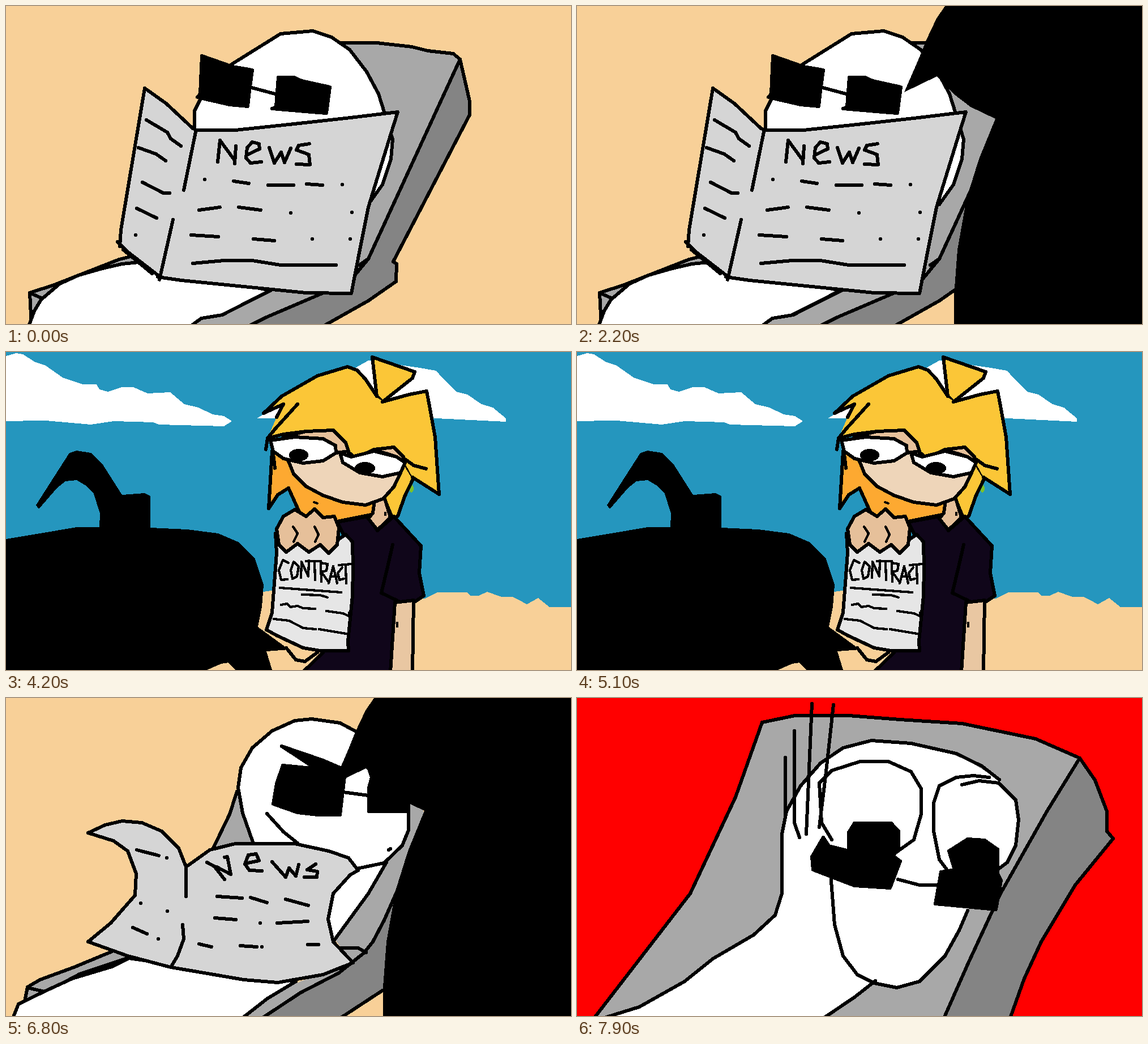
Recreate the animation shown at these times as an HTML page. Size 998 by 561 pixels, loop 8000 ms.

```html
<!DOCTYPE html>
<html lang="en">
<head>
<meta charset="utf-8">
<title>Newspaper and shadow</title>
<style>
html, body { margin: 0; width: 100%; height: 100%; overflow: hidden; }
svg { display: block; width: 100vw; height: 100vh; shape-rendering: crispEdges; }
path, ellipse { stroke: #000; stroke-width: 6; stroke-linecap: round; stroke-linejoin: round; fill: none; }
.thick path { stroke-width: 7.6; }
path.fine { stroke-width: 4.2; }
.light { fill: #a8a8a8; } .dark { fill: #848484; } .paper { fill: #d5d5d5; }
.white { fill: #fff; } .black { fill: #000; } .hair { fill: #fbc637; } .beard { fill: #fda931; }
.skin { fill: #e6c09a; } .arm { fill: #e9c7a2; } .face { fill: #eed5b9; } .sand { fill: #f8d098; }
.shirt { fill: #10061a; } .sheet { fill: #e6e6e6; } .leaf { fill: #7ac12b; }
path.bare, ellipse.bare { stroke: none; }
</style>
</head>
<body>
<svg viewBox="0 0 998 561">
<rect id="backdrop" width="998" height="561"/>

<g data-scene="reading">
  <g data-boil="0 -2 0">
    <path class="light" d="M45 565L42 506 85 492 200 447 228 440 235 455 95 490 50 538ZM42 506L62 515"/>
    <path class="white" d="M40 565L50 538 62 518 95 490 128 475 170 463 205 455 235 452 467 502 382 545 330 565"/>
  </g>
  <path class="light bare" d="M590 65L655 65 717 72 745 79 790 84 802 94 640 448 612 482 556 508 428 561H330L345 551 382 545 467 502 500 400Z"/>
  <path class="dark" d="M802 94L819 168V192L684 451 690 455 689 486 640 520 560 565H428L460 549 556 508 612 480 640 446Z"/>
  <path d="M590 65H655L717 72 745 79 790 84 802 94M640 446L624 457M330 562L345 551 382 545 425 523 467 502"/>
  <path class="white" d="M333 218V185L343 165 395 105 485 49 542 44 575 55 607 77 637 116 658 155 669 190 683 235 680 270 665 315 640 350 560 300"/>
  <path class="black" d="M346 88L400 107 435 113 430 150 427 177 395 174 338 161 343 155ZM481 126H509L522 132 572 143 566 189 540 187 470 181 477 178Z"/>
  <path d="M430 143L475 155"/>
  <g data-boil="0 -5 0">
    <path class="paper bare" d="M245 145L283 172 337 219 405 219 500 209 692 187 640 355 610 507 530 506 271 478 201 420Z"/>
    <path d="M201 424L203 395 245 145 283 172 330 216 337 219H405L500 209 600 198 692 187 680 225 660 290 640 355 625 430 610 507 530 506 440 497 310 484 268 478M335 222L314 325M295 377L271 483M197 416L214 433 271 477M207 430L258 472"/>
    <path d="M248 201L285 223 291 234 309 247M234 250L265 261 282 273M241 311L278 330H289M231 357L266 374M229 404h.1M351 306h.1M402 309L429 313M463 316H508M531 314L559 316M594 315h.1M341 360L378 355M411 355L450 360M503 365h.1M611 364h.1M327 404L375 407M437 411L474 414M541 411h.1M608 411h.1M330 454L385 449H435L485 457H583"/>
    <path aria-label="News" d="M374 275L378 237 403 271M406 247L404 278M425 263L448 252 447 243 435 240 426 250 424 268 432 277 451 275M465 250L474 277 486 258 492 276 503 251M536 243L517 246 513 254 535 262 537 280 513 279"/>
  </g>
</g>

<g data-scene="glaring smirking">
  <path class="light bare" d="M425 125L365 268 436 258 580 425 613 467 520 500 385 561H455L588 485 632 450 648 430 668 392 740 230 737 195 600 100Z"/>
  <path class="dark" d="M740 230L668 392 648 430 632 450 588 485 520 520 452 565H590L665 516H740"/>
  <path d="M583 441H622L636 449"/>
  <path class="light" d="M30 565L32 540 38 510 60 497 120 475 190 446 220 457 130 487 72 518 33 561ZM38 511L72 519"/>
  <g data-scene="glaring">
    <path d="M430 118L415 155 395 205 365 267"/>
    <path class="white" d="M33 565L45 540 72 518 130 487 215 455 300 470 510 500 430 543 376 565"/>
    <path class="white bare" d="M560 260L672 283 660 315 600 390 580 430 540 350Z"/>
    <path d="M672 285L660 315 640 342 600 390 580 430"/>
    <path class="white" d="M436 256L420 215V160L430 118 445 78 470 53 510 40 560 46 610 66 711 150V235L700 260 672 280 630 285 585 278 520 255"/>
    <path d="M455 217L485 238 520 255"/>
    <path class="black" d="M482 87L541 106H592L596 123 530 116Z"/>
    <path class="black" d="M473 125L545 112 590 110 587 193 581 200H478L473 195ZM663 160V185L711 193V150Z"/>
    <path d="M595 157H662"/>
  </g>
  <g data-scene="smirking">
    <path d="M408 165L395 205 365 267"/>
    <path class="white" d="M20 565L30 540 75 518 125 495 195 474 225 459 300 470 520 500 470 530 425 565" data-boil="0 -4 0"/>
    <path class="white bare" d="M560 260L672 290 640 345 580 427 540 350Z"/>
    <path d="M672 290L640 345 580 427"/>
    <g data-boil="0 0 -1">
      <path class="white" d="M436 256L418 205 410 160 415 125 435 90 470 60 510 42 540 39 590 46 620 62 711 190V235L700 262 668 293 620 303 600 285 515 260"/>
      <path d="M461 206L490 238 515 258M676 270l3-2"/>
      <path class="black" d="M487 87L560 112 597 128 540 122Z"/>
      <path class="black" d="M489 121L540 126 599 132 590 208H550L515 204 472 189 478 153ZM642 130L646 142 641 160V202H708V140Z"/>
      <path d="M595 168L640 174"/>
    </g>
  </g>
  <path class="paper" d="M145 238L175 224 205 217 240 220 275 235 305 265 318 298 360 268 405 257H510L570 270 605 282 622 304 608 312 578 345 569 390 578 430 613 467 560 488 480 502 420 497 350 485 291 475 215 455 145 430 185 397 228 348 230 310 215 270 190 252Z"/>
  <path d="M318 295V350M312 400L314 425 303 455 291 475"/>
  <path d="M231 268L270 278M284 282h.1M238 362h.1M285 376h.1M224 405L249 416M269 425h.1M373 350L417 353M432 352L461 361M494 355L534 366M369 388L406 391M449 397h.1M479 397L533 394M341 434L363 439M414 437L443 439M452 439h.1M533 435H552"/>
  <path aria-label="News" d="M355 290L368 297 386 320M372 298L397 311 391 280 386 281M427 291L447 287 442 275 428 277 422 293 430 304 452 305M470 289L494 316 500 300 512 314 517 294M547 293L532 303 550 306 549 316H527"/>
</g>

<g id="shadow" data-scene="reading glaring smirking">
  <path class="black bare" d="M650 0L635 22 617 60 605 90 578 152 636 124 665 155 695 178 739 199 710 270 688 340 672 430 666 510V561H998V0Z"/>
  <path class="black bare" d="M636 0L628 35 612 70 600 105 594 159 630 129 662 161 690 185 737 199 705 270 683 340 668 400 661 510V561H998V0Z"/>
</g>

<g data-scene="contract">
  <g data-boil="0 2 0">
    <path class="white bare" d="M-10 10L18 2 30 4 50 17 70 24 100 45 135 57 160 57 165 66 180 70 205 62 225 62 250 73 290 71 315 92 340 98 365 110 385 113 399 122 385 131 270 128 260 124 190 122 150 128 70 121-10 122Z"/>
    <path class="white bare" d="M443 117L480 95 560 60 640 15 725 27 760 33 770 45 795 70 815 75 840 92 860 98 883 117V123L760 117Z"/>
  </g>
  <path class="sand bare" data-boil="0 0 1" d="M0 480L455 423 475 420 600 430 740 435 762 424H815L820 430H835L850 423 875 432H895L905 437 920 445 940 434 960 450H998V565H0Z"/>
  <g data-boil="0 0 -1">
    <ellipse class="leaf bare" cx="716" cy="241" rx="4" ry="7"/>
    <path class="hair" d="M668 258L682 292 692 290 704 255 720 222 700 190"/>
    <path class="beard" d="M470 175L464 276 480 252 499 240 518 282 550 305 590 298 650 286 655 245 500 190"/>
    <path class="shirt" d="M524 565L560 530 600 330 585 300 640 290 656 315 685 290 733 342 730 390 738 430 720 442 688 440 680 565Z"/>
    <path d="M683 340L675 375 663 425 690 438"/>
    <path class="arm" d="M687 442L720 438 718 565H679Z"/>
    <path class="skin" d="M651 262L648 284 640 294 656 314 679 292 668 255"/>
    <path class="face" d="M478 160L500 195 508 215 530 237 560 253 595 265 635 270 666 259 685 238 697 213 702 180 590 150Z"/>
    <path class="hair" d="M647 9L722 35 718 46 665 88 655 78Z"/>
    <path class="hair bare" d="M455 108L487 78 550 42 603 26 620 32 655 80 667 88 742 70 748 95 758 150 765 251 718 221 700 188 685 168 650 172 618 187 602 175 578 138 490 145 462 152 478 115 490 92Z"/>
    <path d="M455 108L487 78 550 42 603 26 620 32 635 48 655 78M665 88L712 75 743 69 748 95 758 150 765 251 718 221M455 108L490 92 478 115M515 92L476 135 462 152 459 172M472 180L475 205M742 206L720 200 702 187 685 168 650 172 618 187 605 177 590 150 578 138 530 140 490 145 462 152"/>
    <path class="skin" d="M490 150L530 140 578 138 600 160 605 175 583 178 582 165 560 153ZM650 172L685 168 702 185V195L690 185Z"/>
    <path class="white" d="M467 156L510 150 560 153 582 165 583 178 560 192 525 196 490 188 472 175ZM590 178L610 185 650 175 690 185 705 195 697 213 665 220 625 213 595 195Z"/>
    <ellipse class="black bare" cx="517" cy="182" rx="17" ry="11"/>
    <ellipse class="black bare" cx="634" cy="205" rx="18" ry="11"/>
    <path class="fine" d="M544 265l6 2M670 284v3M691 478v6"/>
    <path class="sand" d="M495 522L512 543 528 546 550 530"/>
    <path class="sheet" d="M476 320L478 355 470 460 460 490 478 500 525 522 555 527H605L604 510 612 430 613 380 612 335 600 322 588 330Z"/>
    <path class="skin" d="M478 312L490 290 510 278 530 290 545 277 560 292 580 290 588 310 585 340 570 355 555 340 535 353 515 338 495 353 482 340Z"/>
    <path class="fine" d="M507 308L515 320 508 335M545 308L552 322 546 335"/>
    <path class="fine" aria-label="CONTRACT" d="M499 372L489 367 482 385 486 402 497 401M508 370L503 385 506 400 514 396 517 378ZM521 398L522 370 534 396 535 368M530 369H556M545 370L546 402M557 405L556 372 568 374 566 386 557 388 570 406M570 408L578 378 585 408M573 396H584M594 380L586 390 589 402 597 400M588 376L610 374M600 377L601 408"/>
    <path class="fine" d="M484 416L592 424M523 428L555 429 568 433M486 446L497 444 502 450 515 448 525 452 546 453M566 457L595 461 606 466V460M473 471L500 474 525 487 547 489M553 489L601 497"/>
  </g>
  <path class="black bare" d="M0 330L60 320 125 309H165L166 285 155 250 140 235 125 226 105 228 90 240 58 277 53 270 85 220 112 178 125 174 150 178 170 197 205 252 245 249 255 254V310L320 313 375 320 410 335 440 365 455 410 452 450 445 485 500 525 460 528 470 561H405L393 548 380 550 355 561H0Z"/>
</g>

<g data-scene="shocked" class="thick">
  <path class="light" d="M405 85L425 50 440 30 475 20 560 12H660L812 175 670 490 640 515 330 255Z"/>
  <path class="dark bare" d="M815 175L670 490 625 522 590 530 590 561H700L720 550 760 400Z"/>
  <path d="M812 175L670 490 630 522M610 486L645 485 665 492M720 550L700 563"/>
  <path class="white bare" d="M560 260L668 328 650 370 630 392 600 390Z"/>
  <path d="M668 328L650 370 630 392"/>
  <path class="white" d="M-10 545L100 503 215 549 300 550 330 570H-10"/>
  <g data-boil="1 0 2">
    <path class="white" d="M424 247L412 190 408 130 412 90 430 60 460 35 500 20 545 16 600 25 640 45 680 73 700 115 726 225V260L705 300 662 324"/>
    <path class="white" d="M500 155L503 125 525 102 555 97 590 105 612 130 614 155 608 175M658 167L665 140 685 124 712 122 738 135 744 160V170"/>
    <path class="black" d="M550 162L570 148 587 156V175H552ZM695 164L712 159 720 165V172Z"/>
    <path class="black" d="M488 156L520 160 612 174 602 226 540 218 483 200ZM653 168L743 172 740 190 733 224 651 211Z"/>
    <path d="M615 190L635 188 650 190M460 203L478 225 490 246"/>
  </g>
  <path class="paper" d="M12 229L65 202 140 199 190 210 230 245 262 292 345 255 420 247 490 250 560 265 640 282 682 302 640 335 622 390 612 450 615 510 654 540 600 565H340L325 557 300 550 215 549 165 520 105 498 25 476 60 440 95 410 126 345 120 305 95 270 50 248Z"/>
  <path d="M259 292V377M237 503L212 550"/>
  <path d="M97 261L143 258M156 261L208 290M134 391L189 399M211 405h.1M110 455L192 485M300 380H382L405 376 418 385H445M475 388h.1M540 385h.1M306 434L348 437M420 446L480 433H540M299 501L352 503M402 503h.1M530 500L592 503"/>
  <path aria-label="News" d="M311 287L325 300 343 338M325 300L371 319 350 275M397 292L433 285 432 270 405 273 395 290 402 308 420 317 440 314M468 292L495 325 505 305 520 323 528 295M573 298L545 305 547 312 573 318 572 332 545 330"/>
  <path class="black bare" d="M652 0L640 40 605 112 640 95 683 73 715 115 750 148 815 175 775 270 740 390 722 500 720 561H998V0Z"/>
</g>

<g data-scene="closeup">
  <path class="light" d="M30 565L200 345 280 175 327 43 385 31H480L570 38 680 45 810 72 888 106 830 200 748 345 690 470 648 565Z"/>
  <path class="dark" d="M888 106L915 145 936 200V235L947 248 880 330 820 430 790 495 765 565H648L690 470 748 345 830 200Z"/>
  <g data-boil="1 0 3">
    <path class="white bare" d="M58 565L110 545 190 500 240 460 312 418 350 380 362 345V240L370 200 395 155 430 115 470 88 520 75 590 80 670 98 746 144 778 200V240L740 310 690 375 665 430 625 485 580 510H545L525 500 440 565Z"/>
    <path d="M52 563L110 545 190 500 240 460 312 418 350 383 362 345V240L370 200 395 155 430 115 470 88 520 75 590 80 670 98 715 120 746 144M448 310L455 400 470 455 495 488 525 503 565 511 605 500 650 455 675 410 690 375M527 499L490 528 438 563"/>
    <path class="white" d="M450 250L432 220 428 150 450 128 500 112H550L590 130 608 160V205L595 250 560 275M655 305L640 285 630 235V185L640 155 670 140 700 137 728 140"/>
    <path class="white" d="M680 153L710 146 745 150 775 180 780 215 775 260 760 290 740 305"/>
    <path class="black" d="M480 237L490 221H555L568 235V262L559 279 571 288 553 335 490 331 417 303 415 280 435 246 445 261 480 270ZM657 270L690 249 720 251 743 267V310L749 322 740 373 633 363 643 307 667 303Z"/>
    <path d="M567 320L605 330H635"/>
  </g>
  <path d="M368 105V210M384 58V220L393 246M415 10L405 240M453 12L440 130 428 228"/>
</g>
</svg>
<script>
const LOOP = 8000, STEP = 100;
const timeline = [
  [0, "reading", "#f8d098"],
  [2500, "glaring", "#f8d098"],
  [3400, "contract", "#2596be"],
  [5300, "smirking", "#f8d098"],
  [7000, "shocked", "#f00"],
  [7600, "closeup", "#f00"]
];
const backdrop = document.getElementById("backdrop");
const shadow = document.getElementById("shadow");
const groups = document.querySelectorAll("[data-scene]");
const boils = [...document.querySelectorAll("[data-boil]")].map(node => {
  const [rest, dx, dy] = node.dataset.boil.split(" ").map(Number);
  return { node, rest, dx, dy };
});
const show = (node, visible) => node.style.display = visible ? "" : "none";

function draw(time) {
  const step = Math.floor(time / STEP);
  const [, scene, color] = timeline.findLast(([start]) => time >= start);
  let pose = step % 3;
  // Once the shadow has arrived only two drawings alternate.
  if (step >= 19 && step < 34 && pose === 0) pose = 2;

  backdrop.setAttribute("fill", color);
  groups.forEach(group => show(group, group.dataset.scene.split(" ").includes(scene)));
  boils.forEach(({ node, rest, dx, dy }) => {
    const shift = pose - rest;
    node.setAttribute("transform", `translate(${shift * dx} ${shift * dy})`);
  });

  const arrival = Math.min(1, Math.max(0, (step - 9) / 9));
  const altered = pose === 2 && scene !== "smirking";
  shadow.setAttribute("transform", `translate(${430 * (1 - arrival) ** 2} 0)`);
  show(shadow.children[0], !altered);
  show(shadow.children[1], altered);
}

function tick() {
  draw(performance.now() % LOOP);
  requestAnimationFrame(tick);
}
tick();
</script>
</body>
</html>
```
